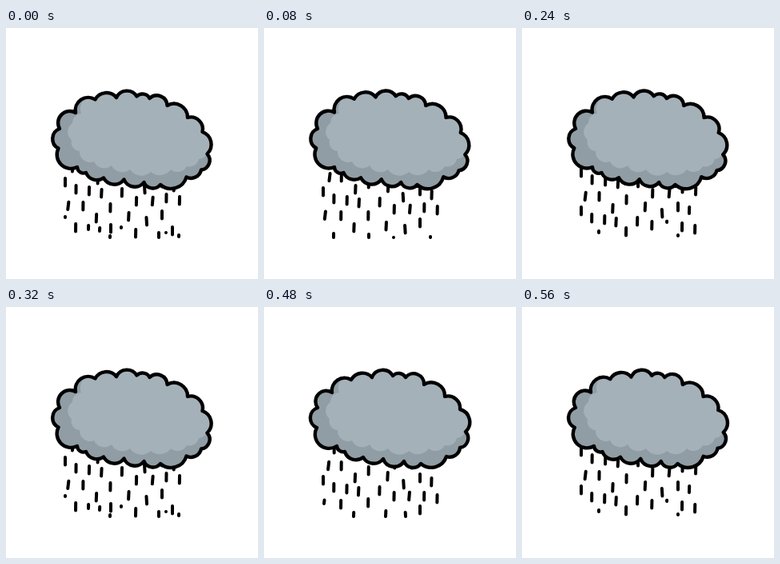
These frames come from a looping animation (315 px wide and 314 px high, 640 ms). An HTML page without scripts:

```html
<!DOCTYPE html>
<html lang="en">
<head>
<meta charset="utf-8">
<title>Rain cloud</title>
<style>
  html, body { margin: 0; width: 100%; height: 100%; overflow: hidden; background: #fff; }
  svg { display: block; width: 100vw; height: 100vh; }

  /* Each column is a dashed line that slides down one period in four steps */
  .rain {
    --period: 48;
    fill: none;
    stroke: #000;
    stroke-width: 4;
    stroke-linecap: round;
  }
  .slow { --period: 40; }
  .rain path {
    stroke-dasharray: 9.5 calc(var(--period) - 9.5);
    animation: fall 320ms steps(4) -.4ms infinite;
  }
  @keyframes fall { to { stroke-dashoffset: calc(var(--period) * -1px); } }

  /* The outline sways between two poses, four steps each way */
  .cloud { animation: sway 640ms steps(4) -480.4ms infinite; }
  @keyframes sway {
    0%, 100% {
      d: path("M67 126A16 16 0 0 1 89 105A16 16 0 0 1 114 88A16 16 0 0 1 141 86A14.5 14.5 0 0 1 166 85A10 10 0 0 1 182 88A13 13 0 0 1 203 97A17 17 0 0 1 228 112A15 15 0 0 1 246 132A16.5 16.5 0 0 1 251 159A12 12 0 0 1 243 179A13 13 0 0 1 223 186A20 20 0 0 1 190 196A12 12 0 0 1 170 193A14.5 14.5 0 0 1 146 189A15 15 0 0 1 120 187A14.5 14.5 0 0 1 99 181A8 8 0 0 1 87 174A17.5 17.5 0 0 1 65 150A13.4 13.4 0 0 1 67 126Z");
    }
    50% {
      d: path("M67 126A13.3 13.3 0 0 1 85 107A16 16 0 0 1 109 91A16 16 0 0 1 135 88A14.5 14.5 0 0 1 161 86A10 10 0 0 1 177 88A13 13 0 0 1 200 97A17 17 0 0 1 226 112A15 15 0 0 1 245 128A16.5 16.5 0 0 1 252 156A12 12 0 0 1 245 176A13 13 0 0 1 228 187A20 20 0 0 1 196 196A12 12 0 0 1 175 193A14.5 14.5 0 0 1 149 190A15 15 0 0 1 124 188A14.5 14.5 0 0 1 101 181A8 8 0 0 1 91 174A17.5 17.5 0 0 1 66 151A13.4 13.4 0 0 1 67 126Z");
    }
  }
  .shade { fill: #909da4; }
  .light { fill: #a5b1b9; }
  .line { fill: none; stroke: #000; stroke-width: 4.4; stroke-linejoin: round; }
</style>
</head>
<body>
<svg viewBox="0 0 315 314">
  <clipPath id="body"><path class="cloud"/></clipPath>

  <g class="rain">
    <path d="M74 140L74 237"/>
    <path d="M84 170L75 246"/>
    <path d="M88 149L87 262"/>
    <path d="M97 170L96 256"/>
    <path d="M105 151L103 252"/>
    <path d="M115 185L112 262"/>
    <path d="M122 154L117 254"/>
    <path d="M131 246V262"/>
    <path d="M146 153L144 250"/>
    <path d="M156 183L152 262"/>
    <path d="M191 256V262"/>
    <path d="M201 160L200 256"/>
    <path d="M208 249V262"/>
    <path d="M218 163L216 261"/>
    <g class="slow">
      <path d="M131 180L130 262"/>
      <path d="M164 172L162 262"/>
      <path d="M173 197L177 262"/>
      <path d="M187 172L181 243"/>
      <path d="M195 189V260"/>
      <path d="M210 194L209 232"/>
    </g>
  </g>

  <path class="cloud shade"/>
  <g clip-path="url(#body)">
    <path class="light" d="M112 70V84A17 17 0 0 0 94 107A12 12 0 0 0 83 119A13 13 0 0 0 82 140A11 11 0 0 0 92 154A13 13 0 0 0 110 167A14 14 0 0 0 132 172A15 15 0 0 0 155 177A17 17 0 0 0 181 180A17 17 0 0 0 206 177A13 13 0 0 0 226 173A12 12 0 0 0 241 164A12 12 0 0 0 252 155L265 150V70Z"/>
  </g>
  <path class="cloud line"/>
</svg>
</body>
</html>
```
